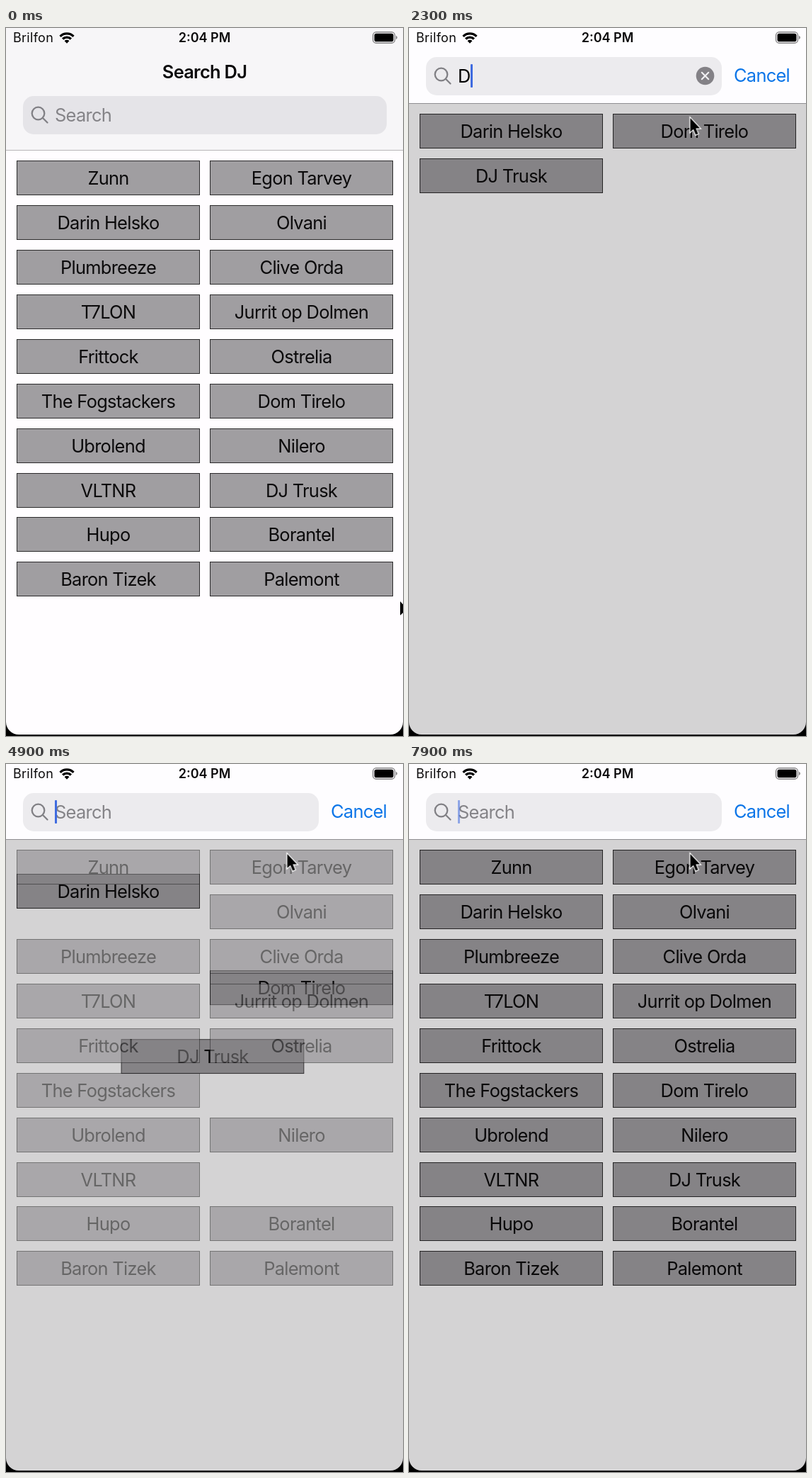
An HTML page that plays this animation: 561 by 999 pixels, repeating every 8 s.

```html
<!DOCTYPE html>
<html lang="en">
<head>
<meta charset="utf-8">
<title>Search DJ</title>
<style>
html, body { margin: 0; width: 100%; height: 100%; overflow: hidden; background: #000; }
body { font: 400 25.4px Inter, Roboto, sans-serif; letter-spacing: -.7px; color: #0b0a0b; }
.stage { position: absolute; left: 0; top: 0; width: 561px; height: 999px; overflow: hidden; }
.stage * { position: absolute; box-sizing: border-box; white-space: nowrap; }
.anim, .cell { animation: 8s ease-in-out infinite; }
.screen { left: 0; top: 0; width: 561px; height: 997px; overflow: hidden; border-radius: 0 0 18px 18px; background: #fffdff; }
.list { left: 0; top: 187px; isolation: isolate; animation-name: scroll; }
.dim { inset: 0; background: rgba(0, 0, 0, .17); animation-name: appear; }

.cell { width: 259px; height: 49px; border: 1px solid #2b2a2b; background: #a09ea1; line-height: 47px; text-align: center; z-index: 1; }
.rest { animation-name: fade-rest; }
.lead { animation-name: fade-lead; }
.first, .third { z-index: 3; }
.first { animation-name: fade-d, move-first; }
.second { z-index: 2; animation-name: fade-do, move-second; }
.third { animation-name: fade-d, move-third; }

.nav { left: 0; top: 0; width: 561px; height: 173px; background: #f7f6f8; border-bottom: 1px solid #b7b6b8; animation-name: nav; }
.status { top: 0; height: 28px; line-height: 28px; font-size: 18px; letter-spacing: 0; }
.network { left: 10px; letter-spacing: .3px; }
.clock { left: 0; width: 561px; text-align: center; font-weight: 600; letter-spacing: 0; }
.icons { left: 0; top: 0; }
.title { left: 0; top: 42px; width: 561px; line-height: 40px; text-align: center; font-weight: 600; animation-name: vanish; }
.cancel { left: 459px; top: 42px; line-height: 50px; color: #0b75e8; animation-name: appear; }

.field { left: 24px; top: 96px; width: 514px; height: 54px; border-radius: 15px; background: #e5e4e8; line-height: 54px; animation-name: field; }
.field svg { left: 0; top: 0; }
.hint { left: 45px; color: #848387; }
.typed { left: 45px; color: #000; }
.typed span { position: static; }
.step { animation-timing-function: step-end; }
.hint { animation-name: when-empty; }
.clear { animation-name: when-filled; }
.key-d { animation-name: key-d; }
.key-o { animation-name: key-o; }
.key-z { animation-name: key-z; }
.typed .key-z { position: absolute; left: 0; }
.caret-pos { left: 45px; top: 10px; animation-name: caret-pos; }
.caret { width: 3px; height: 33px; border-radius: 1px; background: #3f6be0; animation-name: blink; animation-timing-function: linear; }
.cursor { left: 0; top: 0; overflow: visible; animation-name: cursor; }

/* opening the search */
@keyframes scroll { 0%, 14.75% { transform: none; } 19.25%, 100% { transform: translateY(-66px); } }
@keyframes appear { 0%, 14.75% { opacity: 0; } 19.25%, 100% { opacity: 1; } }
@keyframes vanish { 0%, 14.75% { opacity: 1; transform: none; } 18%, 100% { opacity: 0; transform: translateY(-20px); } }
@keyframes nav {
  0%, 14.75% { height: 173px; background: #f7f6f8; border-color: #b7b6b8; }
  19.25%, 100% { height: 107px; background: #fefdff; border-color: #8f8e91; }
}
@keyframes field {
  0%, 14.75% { top: 96px; width: 514px; background: #e5e4e8; }
  19.25%, 100% { top: 41px; width: 418px; background: #ecebee; }
}
@keyframes cursor { 0%, 3% { transform: translate(557px, 809px); } 13.75%, 100% { transform: translate(397.5px, 127px); } }

/* filtering */
@keyframes fade-rest {
  0%, 24.15% { opacity: 1; z-index: 1; } 27.9% { opacity: 0; z-index: 1; }
  59.3% { opacity: 0; z-index: 4; } 63.05%, 74.4% { opacity: 1; }
  78.15%, 86.9% { opacity: 0; } 90.65%, 100% { opacity: 1; z-index: 4; }
}
@keyframes fade-lead {
  0%, 24.15% { opacity: 1; z-index: 1; } 27.9% { opacity: 0; z-index: 1; }
  59.3% { opacity: 0; z-index: 4; } 63.05%, 100% { opacity: 1; z-index: 4; }
}
@keyframes fade-d {
  0%, 41.4% { opacity: 1; } 45.15%, 53.4% { opacity: 0; }
  57.15%, 74.4% { opacity: 1; } 78.15%, 86.9% { opacity: 0; } 90.65%, 100% { opacity: 1; }
}
@keyframes fade-do { 0%, 74.4% { opacity: 1; } 78.15%, 86.9% { opacity: 0; } 90.65%, 100% { opacity: 1; } }
@keyframes move-first {
  0%, 24.15%, 63.05%, 100% { transform: translate(0, 0); }
  27.9%, 59.3% { transform: translate(0, -63px); }
}
@keyframes move-second {
  0%, 24.15%, 63.05%, 100% { transform: translate(0, 0); }
  27.9%, 41.4%, 57.15%, 59.3% { transform: translate(0, -315px); }
  45.15%, 53.4% { transform: translate(-273px, -315px); }
}
@keyframes move-third {
  0%, 24.15%, 63.05%, 100% { transform: translate(0, 0); }
  27.9%, 59.3% { transform: translate(-273px, -378px); }
}

/* typing */
@keyframes when-empty { 0%, 59.3%, 86.25%, 100% { opacity: 1; } 24.15%, 74.1% { opacity: 0; } }
@keyframes when-filled { 0%, 59.3%, 86.25%, 100% { opacity: 0; } 24.15%, 74.1% { opacity: 1; } }
@keyframes key-d { 0%, 59.3%, 100% { opacity: 0; } 24.15% { opacity: 1; } }
@keyframes key-o { 0%, 53.4%, 100% { opacity: 0; } 41.4% { opacity: 1; } }
@keyframes key-z { 0%, 86.25%, 100% { opacity: 0; } 74.1% { opacity: 1; } }
@keyframes caret-pos {
  0%, 59.3%, 86.25%, 100% { transform: none; }
  24.15%, 53.4% { transform: translateX(18px); }
  41.4% { transform: translateX(32px); }
  74.1% { transform: translateX(17px); }
}
@keyframes blink {
  0%, 14.74% { opacity: 0; } 14.75%, 20.4% { opacity: 1; }
  22.9%, 24.14% { opacity: 0; } 24.15%, 29.8% { opacity: 1; }
  32.3%, 35.75% { opacity: 0; } 38.25%, 47% { opacity: 1; }
  49.5%, 53.39% { opacity: 0; } 53.4%, 64.9% { opacity: 1; }
  67.4%, 70.9% { opacity: 0; } 73.4%, 80.75% { opacity: 1; }
  83.25%, 86.24% { opacity: 0; } 86.25%, 91.9% { opacity: 1; }
  94.4%, 97.4% { opacity: 0; } 99.9%, 100% { opacity: 1; }
}
</style>
</head>
<body>
<div class="stage">
  <div class="screen">
    <div class="list anim" id="list"></div>
    <div class="dim anim"></div>
    <div class="nav anim">
      <div class="status network">Brilfon</div>
      <div class="status clock">2:04 PM</div>
      <svg class="icons" width="561" height="28">
        <g fill="none" stroke="#000" stroke-width="3.2">
          <path d="M76.5 11.8A13.4 13.4 0 0 1 95.5 11.8"/>
          <path d="M80.1 15.5A8.3 8.3 0 0 1 91.9 15.5"/>
        </g>
        <path d="M86 21.8L82.6 18.2A4.8 4.8 0 0 1 89.4 18.2Z"/>
        <rect x="518.5" y="5.8" width="31" height="15.4" rx="4.6" fill="none" stroke="#858486" stroke-width="1.4"/>
        <rect x="520.5" y="7.8" width="27" height="11.4" rx="2.8"/>
        <path d="M551 10.8Q555 13.5 551 16.2Z" fill="#858486"/>
      </svg>
      <div class="title anim">Search DJ</div>
      <div class="field anim">
        <svg width="44" height="54" fill="none" stroke="#818085" stroke-width="2.3" stroke-linecap="round">
          <circle cx="21.5" cy="24.5" r="8.8"/>
          <path d="M28 31L34.5 37.5"/>
        </svg>
        <div class="hint anim step">Search</div>
        <div class="typed"><span class="key-d anim step">D</span><span class="key-o anim step">o</span><span class="key-z anim step">Z</span></div>
        <div class="caret-pos anim step"><div class="caret anim"></div></div>
        <svg class="clear anim step" width="418" height="54">
          <circle cx="394.5" cy="26.5" r="12.8" fill="#838186"/>
          <path d="M389.8 21.8l9.4 9.4m0 -9.4l-9.4 9.4" stroke="#f0eff2" stroke-width="2.2" stroke-linecap="round"/>
        </svg>
      </div>
      <div class="cancel anim">Cancel</div>
    </div>
    <svg class="cursor anim" width="16" height="27">
      <path d="M0 0V19.8L4.4 15.7L7.7 23.6L11 22.2L7.8 14.5H13.6Z" stroke="#fff" stroke-width="2.4" paint-order="stroke"/>
    </svg>
  </div>
</div>
<script>
const names = [
  "Zunn", "Egon Tarvey", "Darin Helsko", "Olvani", "Plumbreeze", "Clive Orda",
  "T7LON", "Jurrit op Dolmen", "Frittock", "Ostrelia", "The Fogstackers", "Dom Tirelo",
  "Ubrolend", "Nilero", "VLTNR", "DJ Trusk", "Hupo", "Borantel", "Baron Tizek", "Palemont"
];
const roles = { 0: "lead", 2: "first", 11: "second", 15: "third" };

names.forEach((name, i) => {
  const cell = document.createElement("div");
  cell.className = "cell " + (roles[i] || "rest");
  cell.textContent = name;
  cell.style.left = 15 + 273 * (i % 2) + "px";
  cell.style.top = Math.round(62.93 * Math.floor(i / 2)) + "px";
  document.getElementById("list").append(cell);
});
</script>
</body>
</html>
```
